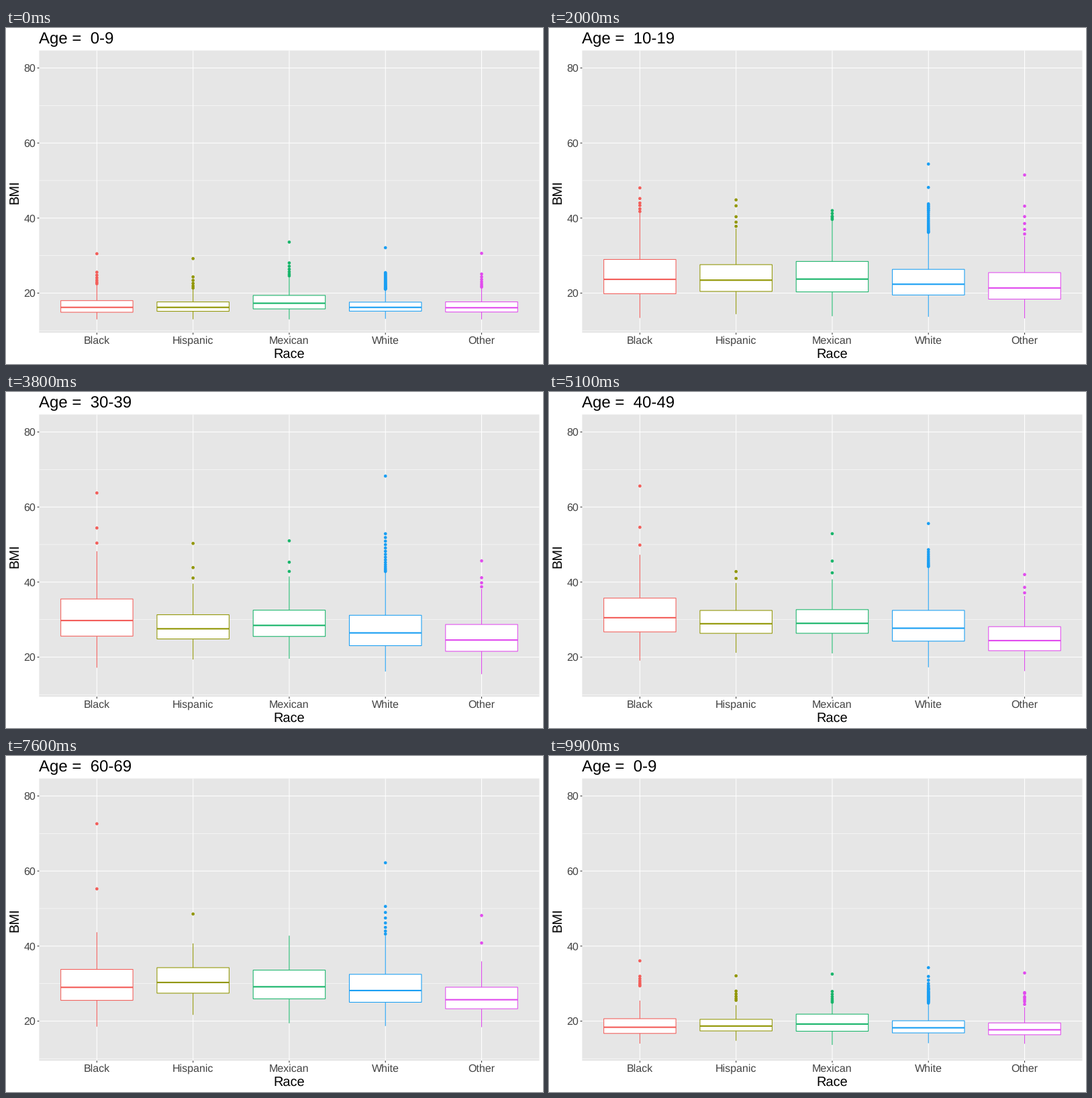
These frames come from a looping animation (800 by 500 pixels, 10000 ms). A matplotlib script:

```python
import matplotlib.pyplot as plt
import numpy as np
from matplotlib.animation import FuncAnimation
from matplotlib.collections import LineCollection
from matplotlib.patches import Rectangle

plt.rcParams.update({"font.family": "Liberation Sans", "text.hinting": "none"})

W, H, DPI = 800, 500, 100
LEFT, RIGHT, TOP, BOTTOM = 49.4, 794.5, 33.5, 453.5
STEP = (RIGHT - LEFT) / 5.2
HALF = 0.375 * STEP

AGES = [f"{d}-{d + 9}" for d in range(0, 70, 10)] + ["70+"]
AGES_N = len(AGES)
KEY_AGES = [0, 1, 2, 4, 5, 7]
STARTS = [7, 20, 33, 46, 59, 71, 83, 95]
MOVE = 6
FRAMES = 100
LOWEST = 13


def pt(px):
    return px * 72 / DPI


def y_at(value):
    return 394.5 - (np.asarray(value, float) - 20) * 335 / 60


fig = plt.figure(figsize=(W / DPI, H / DPI), dpi=DPI, facecolor="white")
ax = fig.add_axes([0, 0, 1, 1])
ax.set_xlim(0, W)
ax.set_ylim(H, 0)
ax.axis("off")


def line(xs, ys, color, width, z):
    return ax.plot(xs, ys, color=color, lw=pt(width), zorder=z, snap=False,
                   solid_capstyle="butt")[0]


def label(x, y, text, size, color="black", **kw):
    return ax.text(x, y, text, fontsize=pt(size), color=color, **kw)


def over_ages(keys):
    return np.interp(range(AGES_N), KEY_AGES, keys)


def box_stats(median, spread, count):
    """Whisker ends and quartiles; larger groups reach nearer the fence."""
    q1 = median - 0.42 * spread
    q3 = median + 0.58 * spread
    low = max(q1 - 0.85 * spread, LOWEST)
    high = q3 + (1.45 - 0.5 / count) * spread
    return np.array([low, q1, median, q3, high])


def outliers(high, peak, count):
    """Values crowding above the whisker, with the peak standing apart."""
    if peak <= high:
        return np.array([])
    near = 0.4 * (np.arange(1, count) / max(count - 1, 1)) ** 1.5
    return high + (peak - high) * np.append(near, 1)


def blend_dots(start, end, t):
    if t == 1:
        return end
    # Shorter lists are recycled; empty ones gather at the other's mean
    if not len(start):
        start = np.array([end.mean()])
    if not len(end):
        end = np.array([start.mean()])
    n = max(len(start), len(end))
    return (1 - t) * np.resize(start, n) + t * np.resize(end, n)


class BoxPlot:
    def __init__(self, index, name, color, size, median, spread, peak):
        counts = [max(1, round(size * 0.79 ** age)) for age in range(AGES_N)]
        self.stats = [box_stats(*v) for v in
                      zip(over_ages(median), over_ages(spread), counts)]
        self.dots = [outliers(s[-1], p, n) for s, p, n in
                     zip(self.stats, over_ages(peak), counts)]

        self.x = LEFT + (0.6 + index) * STEP
        left, right = self.x - HALF, self.x + HALF
        line([self.x] * 2, [TOP, BOTTOM], "white", 1.07, 2)
        line([self.x] * 2, [BOTTOM, BOTTOM + 2.75], "#333333", 1.07, 2)
        label(self.x, 470, name, 16, "#424242", ha="center")
        self.whisker = line([], [], color, 1.07, 4)
        self.box = ax.add_patch(Rectangle(
            (left, 0), right - left, 0, facecolor="white", edgecolor=color,
            lw=pt(1.07), zorder=5, snap=False, joinstyle="miter"))
        self.middle = line([left, right], [0, 0], color, 2.13, 6)
        # Round caps on tiny strokes keep the dots at subpixel positions
        self.marks = ax.add_collection(LineCollection(
            [], colors=color, linewidths=pt(4.8), capstyle="round",
            zorder=4, snap=False), autolim=False)

    def update(self, a, b, t):
        stats = (1 - t) * self.stats[a] + t * self.stats[b]
        low, q1, mid, q3, high = y_at(stats)
        self.whisker.set_data([self.x] * 5, [low, q1, np.nan, q3, high])
        self.box.set_y(q3)
        self.box.set_height(q1 - q3)
        self.middle.set_ydata([mid, mid])
        ys = y_at(blend_dots(self.dots[a], self.dots[b], t))
        self.marks.set_segments(
            [[(self.x - 0.01, y), (self.x + 0.01, y)] for y in ys])


ax.add_patch(Rectangle((LEFT, TOP), RIGHT - LEFT, BOTTOM - TOP,
                       facecolor="#E6E6E6", lw=0, zorder=0, snap=False))
for value in range(10, 90, 10):
    y = y_at(value)
    major = value % 20 == 0
    line([LEFT, RIGHT], [y, y], "white", 1.07 if major else 0.53, 1)
    if major:
        line([LEFT - 2.75, LEFT], [y, y], "#333333", 1.07, 2)
        label(44.3, y + 5.8, str(value), 16, "#424242", ha="right")

label((LEFT + RIGHT) / 2, 491, "Race", 20, ha="center")
label(18.5, (TOP + BOTTOM) / 2 + 0.5, "BMI", 20, rotation=90,
      rotation_mode="anchor", ha="center", va="baseline")
title = label(LEFT - 0.2, 23.2, "", 24)

plots = [
    BoxPlot(0, "Black", "#F35E5A", size=7,
            median=[16.2, 22.6, 29, 30.5, 28.8, 29.2],
            spread=[3.1, 8.8, 10.8, 9, 8.5, 8],
            peak=[30.5, 47.2, 61.9, 65.6, 81.3, 63.9]),
    BoxPlot(1, "Hispanic", "#929705", size=6,
            median=[16.2, 22.9, 26.2, 28.9, 29.5, 31.1],
            spread=[2.5, 7.2, 6.8, 6.1, 7.6, 6],
            peak=[29.2, 45.7, 57.8, 42.8, 50.7, 46.4]),
    BoxPlot(2, "Mexican", "#18B56A", size=7,
            median=[17.3, 22.9, 27.9, 29, 29.5, 28.8],
            spread=[3.6, 8.2, 7.7, 6.3, 6, 9.3],
            peak=[33.6, 41.6, 49.1, 52.9, 43.7, 40]),
    BoxPlot(3, "White", "#1A9FF3", size=32,
            median=[16.2, 21.8, 25.2, 27.7, 28, 28.3],
            spread=[2.4, 6.6, 8, 8.2, 7.5, 7.4],
            peak=[32.1, 56.6, 80.9, 55.6, 59.2, 65.2]),
    BoxPlot(4, "Other", "#E14CEE", size=8,
            median=[16.1, 20.7, 24.7, 24.4, 25.8, 25.6],
            spread=[2.7, 6.9, 7.9, 6.4, 6.1, 5.4],
            peak=[30.6, 53.7, 49.3, 42, 52.3, 44]),
]


def draw(frame):
    a = sum(frame >= s for s in STARTS) - 1
    step = min(frame - STARTS[a] + 1, MOVE) if a >= 0 else MOVE
    a %= AGES_N
    b = (a + 1) % AGES_N
    title.set_text("Age =  " + AGES[a if step <= MOVE // 2 else b])
    for plot in plots:
        plot.update(a, b, step / MOVE)
    return []


anim = FuncAnimation(fig, draw, frames=FRAMES, interval=100, repeat=True,
                     repeat_delay=0, blit=False)
plt.show()
```
